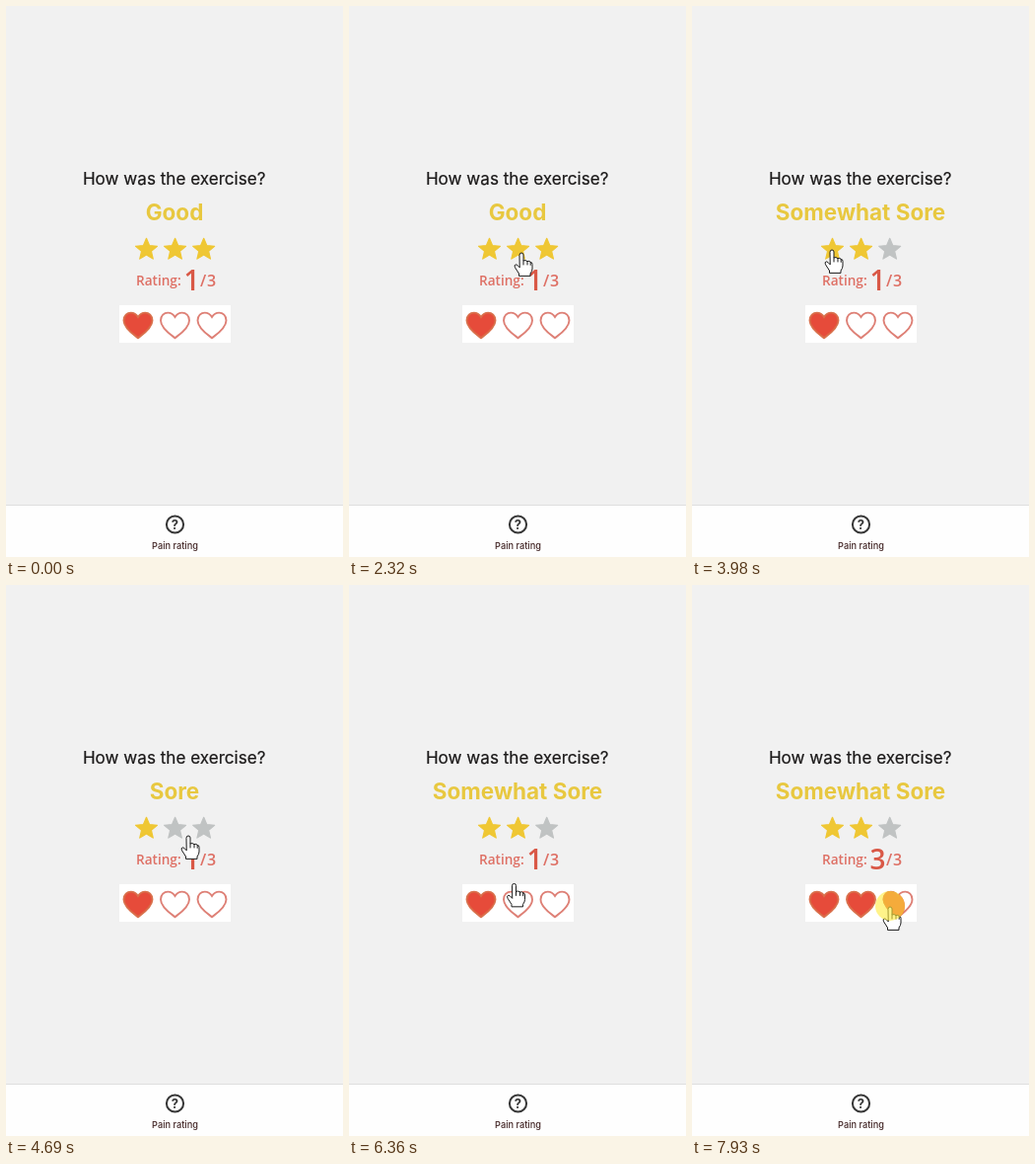
Animation, 342 px wide and 558 px high, one loop 8 s. Source, as an HTML page:

```html
<!DOCTYPE html>
<html lang="en">
<head>
<meta charset="utf-8">
<title>Exercise rating</title>
<style>
  html, body { margin: 0; width: 100%; height: 100%; overflow: hidden; background: #f1f1f1; }
  svg { display: block; width: 100%; height: 100%; }
  text { font-family: Inter, sans-serif; }
  .mid { text-anchor: middle; }
  .rate text { font-family: "Open Sans", "Noto Sans", sans-serif; font-weight: 600; fill: #de7065; }
  .rate #score { fill: #d95846; }
</style>
</head>
<body>
<svg viewBox="0 0 342 558">
  <defs>
    <path id="heart" d="M0 13C-4 10-14.5 3-14.5-4.8C-14.5-9.8-11-12.6-7.3-12.6C-4-12.6-1.5-10.8 0-8.3C1.5-10.8 4-12.6 7.3-12.6C11-12.6 14.5-9.8 14.5-4.8C14.5 3 4 10 0 13Z"/>
    <clipPath id="spot"><circle cx="201" cy="325" r="15"/></clipPath>
  </defs>
  <rect width="342" height="558" fill="#f1f1f1"/>
  <text class="mid" x="170.7" y="181" font-size="17.1" fill="#1c1a1a" stroke="#1c1a1a" stroke-width=".2">How was the exercise?</text>
  <text class="mid" id="label" x="171" y="217" font-size="22.5" font-weight="700" fill="#e8c840"></text>
  <g id="stars" stroke-width="1.2" stroke-linejoin="round"></g>
  <g class="rate">
    <text x="132" y="283" font-size="13.6">Rating:</text>
    <text class="mid" id="score" x="188.5" y="288" font-size="28"></text>
    <text x="197" y="284" font-size="16">/</text>
    <text x="204" y="284" font-size="16">3</text>
  </g>
  <rect x="115" y="303" width="113" height="38" fill="#fff"/>
  <g id="hearts" stroke-width="1.9"></g>
  <rect y="505" width="342" height="53" fill="#fefefe"/>
  <rect y="505" width="342" height="1" fill="#dedede"/>
  <circle cx="171.5" cy="525" r="8.6" fill="none" stroke="#363636" stroke-width="2"/>
  <text class="mid" x="171.5" y="529.7" font-size="13" font-weight="700" fill="#363636">?</text>
  <text class="mid" x="171.5" y="550.4" font-size="9.2" font-weight="500" fill="#412424">Pain rating</text>
  <g id="hand" stroke="#1a1a1a" stroke-linejoin="round" stroke-linecap="round">
    <path fill="#fff" d="M-2 2a2 2 0 0 1 4 0V8q2-1.2 4 .6q2-.8 3.4.8q1.6 0 1.6 2.2V16q0 2.5-2 5V23.4H-2.5V21L-6.5 14.8q-1.3-2.6.8-3q1.6 0 3.7 2.8Z"/>
    <path fill="none" d="M2 8V12M6 8.6V12M9.2 9.4V12.3"/>
  </g>
  <circle id="tap" r="15" fill="#ffeb3c" opacity=".6"/>
</svg>
<script>
const LOOP = 8000, TAP = 110;
const LAG = { stars: 310, hearts: 40 };
const LABELS = ["", "Sore", "Somewhat Sore", "Good"];
const $ = id => document.getElementById(id);

// Each move eases the pointer to a place; a tap there sets a score
const moves = [
  { from: 540, to: 1270, x: 188, y: 277 },
  { from: 1390, to: 1820, x: 167, y: 250 },
  { from: 2020, to: 2070, x: 175, y: 250, tap: 2210, stars: 2 },
  { from: 2520, to: 3860, x: 142, y: 247, tap: 3860, stars: 1 },
  { from: 4240, to: 4690, x: 185, y: 254 },
  { from: 4690, to: 4820, x: 174, y: 247, tap: 4820, stars: 2 },
  { from: 5130, to: 5720, x: 226, y: 257 },
  { from: 5720, to: 6740, x: 141, y: 323, tap: 7130, hearts: 1 },
  { from: 7240, to: 7450, x: 174, y: 325, tap: 7500, hearts: 2 },
  { from: 7640, to: 7870, x: 201, y: 326, tap: 7890, hearts: 3 }
];

const ease = u => u * u * (3 - 2 * u);

function pointer(t) {
  return moves.reduce((p, m) => {
    const k = ease(Math.min(1, Math.max(0, (t - m.from) / (m.to - m.from))));
    return { x: p.x + (m.x - p.x) * k, y: p.y + (m.y - p.y) * k };
  }, { x: 163, y: 562 });
}

const score = (kind, first, t) =>
  moves.reduce((v, m) => m[kind] && t >= m.tap + LAG[kind] ? m[kind] : v, first);

function add(parent, tag, attrs) {
  const el = document.createElementNS("http://www.w3.org/2000/svg", tag);
  for (const k in attrs) el.setAttribute(k, attrs[k]);
  return parent.appendChild(el);
}

function paint(el, fill, stroke) {
  el.setAttribute("fill", fill);
  el.setAttribute("stroke", stroke);
}

function starPoints(cx, cy) {
  return Array.from({ length: 10 }, (_, i) => {
    const r = i % 2 ? 5.2 : 11.5, a = i * Math.PI / 5;
    return (cx + r * Math.sin(a)).toFixed(2) + "," + (cy - r * Math.cos(a)).toFixed(2);
  }).join(" ");
}

const heart = (parent, i) => add(parent, "use", { href: "#heart", x: 134 + 37.5 * i, y: 323.2 });
const stars = [0, 1, 2].map(i => add($("stars"), "polygon", { points: starPoints(142.5 + 29.1 * i, 246.8) }));
const hearts = [0, 1, 2].map(i => heart($("hearts"), i));

// The last heart fills only under the tap
const lit = add($("hearts"), "g", { "clip-path": "url(#spot)" });
paint(lit, "#e64b3a", "#dc5a40");
heart(lit, 2);

function draw(t) {
  const rating = score("stars", 3, t), pain = score("hearts", 1, t);
  const { x, y } = pointer(t);
  $("label").textContent = LABELS[rating];
  $("score").textContent = pain;
  stars.forEach((s, i) => {
    const color = i < rating ? "#efc734" : "#c0c3c3";
    paint(s, color, color);
  });
  hearts.forEach((h, i) => {
    if (i < Math.min(pain, 2)) paint(h, "#e64b3a", "#d9704c");
    else paint(h, "#fff", "#de8076");
  });
  lit.style.display = pain > 2 ? "" : "none";
  $("hand").setAttribute("transform", `translate(${x.toFixed(2)} ${y.toFixed(2)})`);
  $("tap").setAttribute("cx", x);
  $("tap").setAttribute("cy", y - 1);
  $("tap").style.display = moves.some(m => t >= m.tap && t < m.tap + TAP) ? "" : "none";
}

const start = performance.now();
function tick() {
  draw((performance.now() - start) % LOOP);
  requestAnimationFrame(tick);
}
tick();
</script>
</body>
</html>
```
